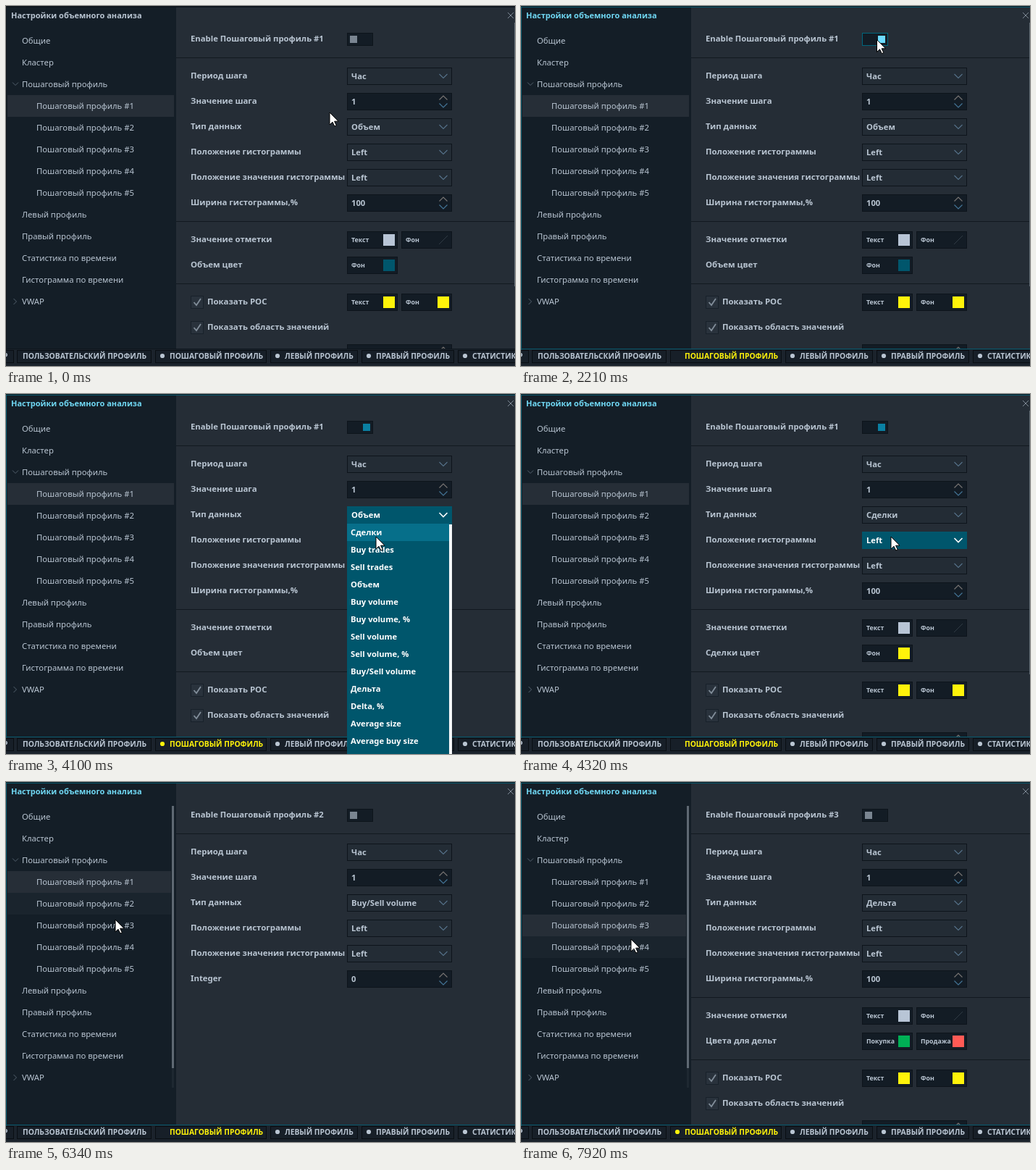
Animation, 703 px wide and 497 px high, one loop 7990 ms. Source, as an HTML page with a canvas:

```html
<!DOCTYPE html>
<html lang="ru">
<head>
<meta charset="utf-8">
<style>
  html, body { margin: 0; height: 100%; overflow: hidden; background: #1b232c; }
  canvas { display: block; }
</style>
</head>
<body>
<canvas id="stage" width="703" height="497"></canvas>
<script>
const ctx = document.getElementById('stage').getContext('2d');
const LOOP = 7990;
const C = {
  panel: '#252d36', side: '#141e27', input: '#131c25', edge: '#0d141b', text: '#b9c5d2',
  chevron: '#56728a', teal: '#00566c', yellow: '#fff30a', pale: '#b8c5d6'
};

// time, x, y of the pointer tip
const PATH = [
  [0, 447, 147], [740, 447, 147], [1100, 491, 44], [2150, 491, 44], [2880, 517, 173],
  [3560, 517, 173], [3870, 513, 192], [3960, 513, 192], [4100, 511, 197], [4640, 511, 197],
  [5300, 189, 206], [5430, 178, 193], [5790, 150, 168], [6150, 150, 168], [6340, 151, 190],
  [6490, 152, 194], [7520, 152, 194], [7920, 152, 217], [LOOP, 152, 217]
];
const MENU = ['Общие', 'Кластер', 'Пошаговый профиль', ...[1, 2, 3, 4, 5].map(n => 'Пошаговый профиль #' + n),
  'Левый профиль', 'Правый профиль', 'Статистика по времени', 'Гистограмма по времени', 'VWAP'];
const TYPES = ['Сделки', 'Buy trades', 'Sell trades', 'Объем', 'Buy volume', 'Buy volume, %', 'Sell volume',
  'Sell volume, %', 'Buy/Sell volume', 'Дельта', 'Delta, %', 'Average size', 'Average buy size'];
const TABS = [[15, 201, 'ПОЛЬЗОВАТЕЛЬСКИЙ ПРОФИЛЬ'], [206, 360, 'ПОШАГОВЫЙ ПРОФИЛЬ'], [365, 486, 'ЛЕВЫЙ ПРОФИЛЬ'],
  [491, 619, 'ПРАВЫЙ ПРОФИЛЬ'], [624, 760, 'СТАТИСТИКА']];
const BUY_SELL = [['Покупка', '#00b055'], ['Продажа', '#ff5a55']];

const clamp = v => Math.max(0, Math.min(1, v));

function pointerAt(t) {
  const i = Math.max(1, PATH.findIndex(p => p[0] > t));
  const [t0, x0, y0] = PATH[i - 1], [t1, x1, y1] = PATH[i];
  const k = clamp((t - t0) / (t1 - t0)), e = k * k * (3 - 2 * k);
  return { x: x0 + (x1 - x0) * e, y: y0 + (y1 - y0) * e };
}

function profileAt(t) {
  if (t < 4320) return { n: 1, type: 'Объем', label: 'Объем цвет', colors: [['Фон', C.teal]] };
  if (t < 6270) return { n: 1, type: 'Сделки', label: 'Сделки цвет', colors: [['Фон', C.yellow]] };
  if (t < 7050) return { n: 2, type: 'Buy/Sell volume', label: 'Цвета для объема', colors: BUY_SELL, partial: t < 6430 };
  return { n: 3, type: 'Дельта', label: 'Цвета для дельт', colors: BUY_SELL };
}

function rect(x, y, w, h, fill) {
  ctx.fillStyle = fill;
  ctx.fillRect(x, y, w, h);
}

function box(x, y, w, h, fill, edge = C.edge) {
  rect(x, y, w, h, edge);
  rect(x + 1, y + 1, w - 2, h - 2, fill);
}

function text(s, x, y, size = 11.4, color = C.text, weight = 600) {
  ctx.font = `${weight} ${size}px "Noto Sans", "Open Sans", sans-serif`;
  ctx.fillStyle = color;
  ctx.fillText(s, x, y + 4);
}

function line(color, width, ...pts) {
  ctx.strokeStyle = color;
  ctx.lineWidth = width;
  ctx.beginPath();
  for (let i = 0; i < pts.length; i += 2) ctx.lineTo(pts[i], pts[i + 1]);
  ctx.stroke();
}

function dot(x, y, color) {
  ctx.fillStyle = color;
  ctx.beginPath();
  ctx.arc(x, y, 3.1, 0, 7);
  ctx.fill();
}

function combo(y, value, hot) {
  box(471, y - 12, 145, 24, hot ? C.teal : '#232c35', hot ? C.teal : C.edge);
  text(value, 477, y, 11.2, hot ? '#fff' : C.text, hot ? 700 : 600);
  line(hot ? '#fff' : C.chevron, hot ? 1.6 : 1.1, 598.5, y - 3, 604, y + 2.5, 609.5, y - 3);
}

function spinner(y, value) {
  box(471, y - 12, 145, 24, C.input);
  text(value, 477, y, 11.2);
  line('#7b7775', 1.1, 598.5, y - 2.5, 604, y - 8, 609.5, y - 2.5);
  line('#45779a', 1.1, 598.5, y + 2.5, 604, y + 8, 609.5, y + 2.5);
}

function swatch(x, y, label, color) {
  box(x, y - 12, 70, 24, C.input);
  text(label, x + 6, y - 1, 8.8);
  if (color) rect(x + 50, y - 8, 16, 16, color);
  else line('#303b45', 1, x + 52, y + 6, x + 64, y - 6);
}

function checkbox(y, label) {
  box(255, y - 8, 18, 18, '#29323c', '#18212a');
  line('#828e9a', 1.8, 259.5, y + 1, 263, y + 5, 269, y - 4);
  text(label, 278, y);
}

function separator(y) {
  rect(235, y, 468, 1, '#121920');
}

function sidebar(t, hover, active, scroll) {
  const selected = t < 6430 ? 3 : t < 7050 ? 4 : 5;
  const right = scroll ? 228 : 232;
  rect(1, 2, 234, 472, C.side);
  text('Настройки объемного анализа', 7, 13, 11, active ? '#70d8f4' : C.text, 700);
  MENU.forEach((name, i) => {
    const y = 48 + i * 30, sub = i > 2 && i < 8;
    const hot = hover.x < 235 && Math.abs(hover.y - y) < 15;
    if (i === selected || hot) rect(2, y - 15, right - 2, 30, i === selected ? '#262e37' : '#1a242d');
    text(name, sub ? 42 : 22, y, 11.3, C.text, 500);
  });
  line('#53616e', 1, 9, 105.5, 13, 109.5, 17, 105.5);
  line('#53616e', 1, 10.5, 404, 14.5, 408, 10.5, 412);
  if (scroll) {
    rect(229, 33, 3, 389, '#1e2831');
    rect(229, 33, 3, 362, '#5f6973');
  }
}

function settings(t, hover, open) {
  const p = profileAt(t);
  const over = y => !open && hover.x > 470 && hover.x < 616 && Math.abs(hover.y - y) < 12;

  text('Enable Пошаговый профиль #' + p.n, 255, 45, 11.3);
  const on = p.n === 1 ? clamp((t - 1440) / 90) : 0;
  const hot = over(46) && hover.x < 507;
  box(471, 37, 36, 18, C.input, hot ? '#00667c' : C.edge);
  rect(475 + 18 * on, 41, 10, 10, hot ? '#6cdaff' : on ? '#0a80a2' : '#7a8591');
  separator(71);

  ['Период шага', 'Значение шага', 'Тип данных', 'Положение гистограммы', 'Положение значения гистограммы',
    p.partial ? 'Integer' : 'Ширина гистограммы,%'].forEach((s, i) => text(s, 255, 96 + i * 35));
  combo(97, 'Час', over(97));
  spinner(132, '1');
  combo(167, p.type, open || over(167));
  combo(202, 'Left', over(202));
  combo(237, 'Left', over(237));
  spinner(272, p.partial ? '0' : '100');
  if (p.partial) return;

  separator(297);
  text('Значение отметки', 255, 322);
  swatch(471, 323, 'Текст', C.pale);
  swatch(546, 323, 'Фон');
  text(p.label, 255, 357);
  p.colors.forEach(([s, color], i) => swatch(471 + 75 * i, 358, s, color));
  separator(383);
  checkbox(408, 'Показать POC');
  swatch(471, 409, 'Текст', C.yellow);
  swatch(546, 409, 'Фон', C.yellow);
  checkbox(443, 'Показать область значений');
  spinner(479, '');
}

function tabs(t) {
  const tab = (x0, x1) => box(x0, 475, x1 - x0, 18, '#171f28', '#090e13');
  rect(0, 474, 703, 23, '#1b232c');
  tab(-20, 11);
  text('Р', -4, 483, 10.3, C.text, 700);
  const blinkOn = t < 1670 || Math.floor((t - 1715) / 496) % 2 === 0;
  TABS.forEach(([x0, x1, name], i) => {
    const color = i === 1 && t >= 1670 ? C.yellow : C.text;
    tab(x0, x1);
    if (i && (i !== 1 || blinkOn)) dot(x0 + 10, 483, color);
    text(name, x0 + (i ? 20 : 8), 483, 10.3, color, 700);
  });
}

function dropdown(hover) {
  rect(471, 179, 145, 318, C.teal);
  TYPES.forEach((name, i) => {
    const y = 191 + i * 24;
    if (Math.abs(hover.y - y) < 12) rect(471, y - 12, 141, 24, '#066f8a');
    text(name, 476, y, 11.2, '#fff');
  });
  rect(612, 180, 4, 317, '#f4f7f9');
}

function pointer({ x, y }) {
  const arrow = [0, 0, 0, 17, 4, 13.2, 6.8, 19, 9.3, 18, 6.6, 12.2, 12, 12.2];
  ctx.beginPath();
  for (let i = 0; i < arrow.length; i += 2) ctx.lineTo(x + arrow[i], y + arrow[i + 1]);
  ctx.closePath();
  ctx.fillStyle = '#fff';
  ctx.fill();
  ctx.strokeStyle = '#000';
  ctx.lineWidth = 1;
  ctx.stroke();
}

function draw(t) {
  const tip = pointerAt(t), hover = pointerAt(Math.max(0, t - 100));
  const active = t >= 1460, open = t >= 3190 && t < 4320;
  const inSidebar = hover.x < 235;

  rect(0, 0, 703, 497, C.panel);
  settings(t, hover, open);
  sidebar(t, hover, active, inSidebar);
  line('#7f8a96', 1, 693, 9, 701, 17);
  line('#7f8a96', 1, 701, 9, 693, 17);
  if (!inSidebar && !open) rect(702, 23, 1, 364, '#5f6973');
  tabs(t);

  const frame = active ? '#07596d' : '#0e161d';
  rect(0, 0, 703, 1, '#10171e');
  rect(0, 1, 703, 1, frame);
  rect(0, 1, 1, 474, frame);
  rect(0, 473, 703, 1, frame);

  if (open) dropdown(hover);
  pointer(tip);
}

function tick() {
  draw(performance.now() % LOOP);
  requestAnimationFrame(tick);
}
tick();
</script>
</body>
</html>
```
